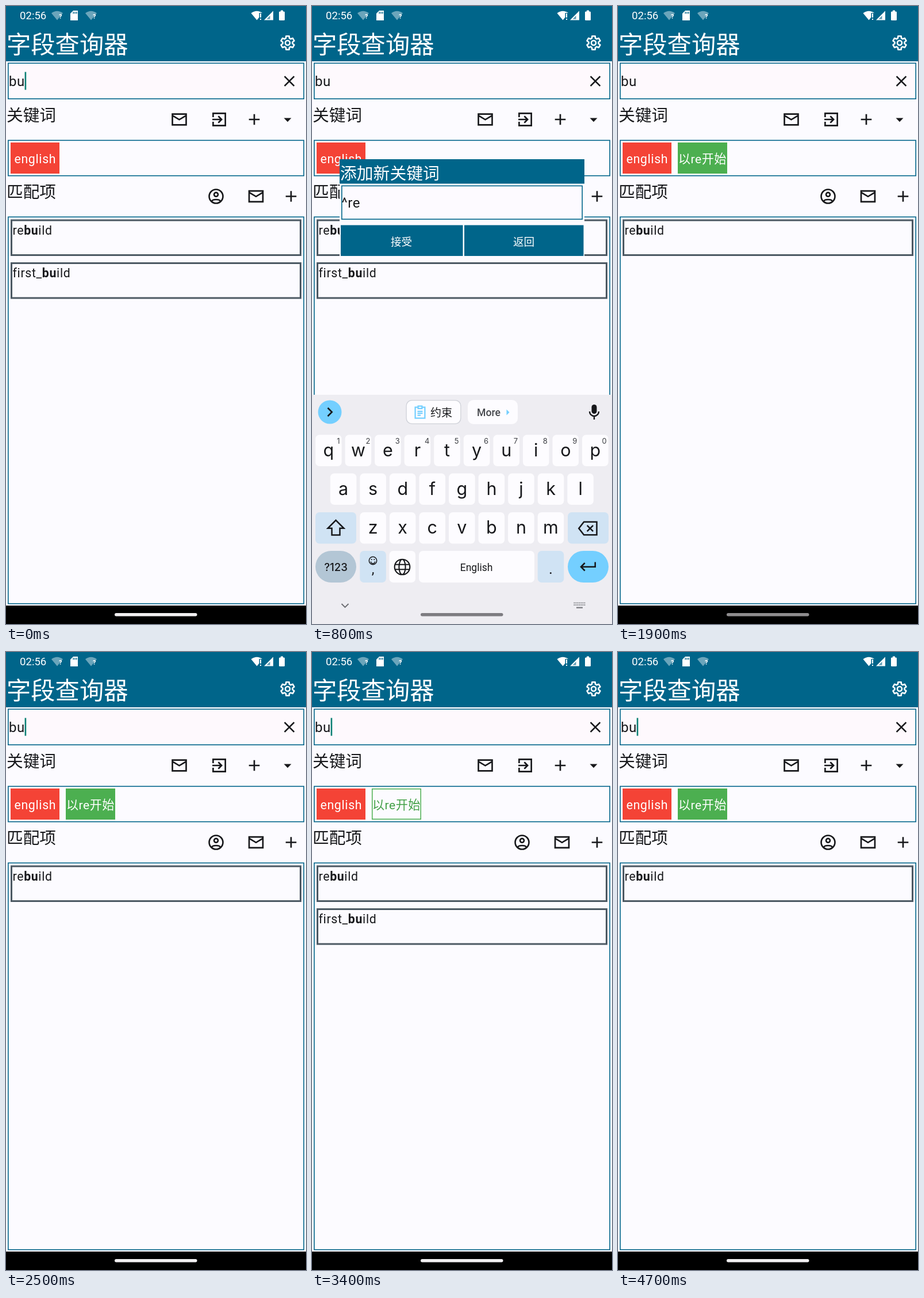
An HTML page with a canvas for the animation above (4.8 s loop, 522 by 1073 pixels).

```html
<!DOCTYPE html>
<html lang="zh-CN">
<head>
<meta charset="utf-8">
<title>字段查询器</title>
<style>
html, body { margin: 0; width: 100%; height: 100%; overflow: hidden; background: #fcfbff; }
canvas { display: block; width: 100vw; height: 100vh; }
</style>
</head>
<body>
<canvas id="stage" width="522" height="1073"></canvas>
<script>
const ctx = document.getElementById('stage').getContext('2d');
const LOOP = 4800, STEP = 100;
const BLUE = '#00658a', PAPER = '#fcfbff', INK = '#17181b', RED = '#f44336', GREEN = '#4caf50';
const KEY = '#fdfcff', TINT = '#d0e3f4', SKY = '#74cfff', BOARD = '#eeedf2';
const SANS = 'Roboto, "Noto Sans CJK SC", "Noto Sans CJK", sans-serif';
const ROUND = 'Inter, Roboto, sans-serif';

// 24-unit icons, drawn as strokes
const ICONS = {
  mail: 'M3 5H21V19H3ZM3 6.8L12 12.2L21 6.8',
  exit: 'M4 9V4H20V20H4V15M3 12H15M10.8 7.7L15.1 12L10.8 16.3',
  plus: 'M5 12H19M12 5V19',
  close: 'M5.7 5.7L18.3 18.3M18.3 5.7L5.7 18.3',
  account: 'M21 12A9 9 0 1 1 3 12A9 9 0 1 1 21 12M14.6 9.6A2.6 2.6 0 1 1 9.4 9.6A2.6 2.6 0 1 1 14.6 9.6M6 18.4C8.4 15.4 15.6 15.4 18 18.4',
  shift: 'M12 3.5L21 12.5H16.5V20H7.5V12.5H3Z',
  erase: 'M8 5H22V19H8L2.5 12ZM11.5 8.8L18 15.2M18 8.8L11.5 15.2',
  globe: 'M21.5 12A9.5 9.5 0 1 1 2.5 12A9.5 9.5 0 1 1 21.5 12M16 12A4 9.5 0 1 1 8 12A4 9.5 0 1 1 16 12M3.4 9H20.6M3.4 15H20.6',
  enter: 'M20.5 7V12.5H4M8.5 8L4 12.5L8.5 17',
  right: 'M9 6L15 12L9 18',
  down: 'M6 9L12 15L18 9',
  clip: 'M9 4.5H4.5V21.5H19.5V4.5H15M9 2.8H15V6.5H9ZM8 11H16M8 14H16M8 17H13'
};

const clamp = v => Math.max(0, Math.min(1, v));
const ramp = (t, a, b) => clamp((t - a) / (b - a));

function fill(x, y, w, h, color, r = 0) {
  ctx.fillStyle = color;
  ctx.beginPath();
  ctx.roundRect(x, y, w, h, r);
  ctx.fill();
}

function box(x, y, w, h, color, line) {
  ctx.strokeStyle = color;
  ctx.lineWidth = line;
  ctx.strokeRect(x + line / 2, y + line / 2, w - line, h - line);
}

function poly(points, color) {
  ctx.fillStyle = color;
  ctx.beginPath();
  points.forEach(([x, y]) => ctx.lineTo(x, y));
  ctx.fill();
}

function disc(x, y, r, color) {
  ctx.fillStyle = color;
  ctx.beginPath();
  ctx.arc(x, y, r, 0, 7);
  ctx.fill();
}

function text(s, x, y, size, color = INK, o = {}) {
  ctx.font = `${o.weight || 400} ${size}px ${o.font || SANS}`;
  ctx.textAlign = o.align || 'left';
  ctx.letterSpacing = (o.gap || 0) + 'px';
  ctx.fillStyle = color;
  ctx.fillText(s, x, y);
  return x + ctx.measureText(s).width;
}

function icon(name, x, y, color = INK, scale = 1.33, line = 2) {
  ctx.save();
  ctx.translate(x, y);
  ctx.scale(scale, scale);
  ctx.translate(-12, -12);
  ctx.strokeStyle = color;
  ctx.lineWidth = line;
  ctx.stroke(new Path2D(ICONS[name]));
  ctx.restore();
}

function scaled(x, y, s, draw) {
  ctx.save();
  ctx.translate(x, y);
  ctx.scale(s, s);
  ctx.translate(-x, -y);
  draw();
  ctx.restore();
}

function gear(x, y) {
  ctx.strokeStyle = '#fff';
  ctx.lineWidth = 2.6;
  ctx.lineJoin = 'round';
  ctx.beginPath();
  for (let i = 0; i < 6; i++) {
    const a = i * Math.PI / 3 + Math.PI / 6;
    [[-.37, 8.6], [-.22, 12], [.22, 12], [.37, 8.6]].forEach(([d, r]) =>
      ctx.lineTo(x + r * Math.sin(a + d + Math.PI / 6), y - r * Math.cos(a + d + Math.PI / 6)));
  }
  ctx.closePath();
  ctx.stroke();
  ctx.beginPath();
  ctx.arc(x, y, 4, 0, 7);
  ctx.stroke();
  ctx.lineJoin = 'miter';
}

function fan(x, color) {
  ctx.fillStyle = color;
  ctx.beginPath();
  ctx.moveTo(x, 24.5);
  ctx.lineTo(x - 10, 12.5);
  ctx.quadraticCurveTo(x, 5, x + 10, 12.5);
  ctx.fill();
}

function header() {
  fill(0, 0, 522, 96, BLUE);
  text('02:56', 24, 23, 18.6, '#fff');
  for (const x of [89, 148]) {
    fan(x, 'rgba(255,255,255,.42)');
    text('?', x + 3, 22, 11, '#fff', { weight: 700 });
  }
  poly([[112, 13], [117, 8], [125, 8], [125, 25], [112, 25]], '#fff');
  for (let i = 0; i < 3; i++) fill(116.5 + i * 2.8, 10, 1.4, 3.5, BLUE);
  fan(436.5, '#fff');
  fill(440.5, 12, 6, 13, BLUE);
  fill(442, 13, 2, 7, '#fff');
  fill(442, 22, 2, 2, '#fff');
  poly([[449, 24.5], [465, 8.5], [465, 24.5]], '#fff');
  poly([[453.5, 22.8], [459.5, 16.8], [459.5, 22.8]], '#5f9db5');
  fill(475, 9.5, 10, 15.5, '#fff', 1.5);
  fill(478, 7.5, 4, 3, '#fff');
  text('字段查询器', 1, 81.5, 42.3, '#fff');
  gear(490, 64);
}

function caret(x, y, h) {
  fill(x, y, 2.6, h, '#0b8074');
}

function row(y, parts) {
  box(8, y, 506, 63.5, '#4c5963', 3);
  let x = 11.5;
  parts.forEach((s, i) => {
    x = text(s, x, y + 26, 21.3, INK, { gap: .66, weight: i === 1 ? 700 : 400 });
  });
}

function ruleChip(on, shade) {
  if (on) fill(104, 237, 86, 54, GREEN);
  fill(104, 237, 86, 54, `rgba(0,0,0,${.13 * shade})`);
  if (!on) box(104, 237, 86, 54, GREEN, 1.5);
  const dim = Math.round(255 - 35 * shade);
  text('以re开始', 105, 273, 21.1, on ? `rgb(${dim},${dim},${dim})` : '#43a047', { gap: .5 });
}

function page(s) {
  fill(0, 96, 522, 977, PAPER);
  fill(4, 100, 514, 61, '#fef9fd');
  box(3, 98.5, 516, 63.5, BLUE, 1.6);
  text('bu', 5, 138.5, 24, INK, { gap: .6 });
  if (s.caret) caret(32.6, 114.5, 31);
  icon('close', 493, 130.5);

  text('关键词', 1, 199.5, 28.7);
  icon('mail', 301.5, 197);
  icon('exit', 371, 197);
  icon('plus', 432, 197);
  poly([[483.5, 194.5], [496.5, 194.5], [490, 201.2]], INK);

  box(3, 232.5, 516, 63, BLUE, 1.6);
  fill(8, 237, 85, 54, RED);
  text('english', 14.5, 273, 21.3, '#fff', { gap: .66 });
  if (s.rule) ruleChip(s.on, s.shade);

  text('匹配项', 1, 332.5, 28.7);
  icon('account', 365.5, 330.5);
  icon('mail', 435, 330.5);
  icon('plus', 496, 330.5);

  box(3, 365.5, 516, 673, BLUE, 1.6);
  row(370.5, ['re', 'bu', 'ild']);
  if (!(s.rule && s.on)) row(445, ['first_', 'bu', 'ild']);
  fill(0, 1041, 522, 32, '#000');
}

function dialog(showCaret) {
  fill(48, 266, 426, 168, PAPER);
  fill(48, 266, 426, 42.5, BLUE);
  text('添加新关键词', 49, 300.5, 28.8, '#fff');
  fill(51, 312, 419, 58, '#fdfaff');
  box(51, 311.5, 420, 59.5, BLUE, 1.6);
  text('^re', 51.5, 350, 24, INK, { gap: .6 });
  if (showCaret) caret(82.2, 325, 32);
  fill(50, 380.5, 212.5, 53.5, BLUE);
  fill(265, 380.5, 207.5, 53.5, BLUE);
  text('接受', 155.5, 415.5, 18.6, '#fff', { align: 'center' });
  text('返回', 368.5, 415.5, 18.6, '#fff', { align: 'center' });
}

function suggestions(shrink) {
  disc(31, 705, 20.5, SKY);
  icon('right', 31, 705, INK, 1.2, 2.2);
  if (shrink < 1) {
    scaled(211.5, 705, 1 - .2 * shrink * 2, () => {
      fill(163.5, 684, 96, 42, '#cfd1d8', 10);
      fill(164.8, 685.3, 93.4, 39.4, KEY, 9);
      icon('clip', 188, 705, SKY, 1.12, 2);
      text('约束', 206, 713, 19);
    });
    scaled(314.5, 705, 1 - .6 * shrink * 2 * .98, () => {
      ctx.globalAlpha = 1 - shrink;
      fill(271, 684, 87, 42, KEY, 10);
      text('More', 287, 712, 17.6, '#44464b', { weight: 500 });
      poly([[338.5, 700.5], [343.5, 705.5], [338.5, 710.5]], SKY);
    });
  }
  fill(486.5, 692, 9, 16, INK, 4.5);
  ctx.strokeStyle = INK;
  ctx.lineWidth = 2.4;
  ctx.beginPath();
  ctx.arc(491, 704, 8, 0, Math.PI);
  ctx.moveTo(491, 712);
  ctx.lineTo(491, 718);
  ctx.stroke();
}

function letters(chars, left, top) {
  [...chars].forEach((c, i) => {
    const x = left + i * 51.56;
    fill(x, top, 45.6, 54.5, KEY, 7);
    text(c, x + 22.8, top + 37, 30.5, INK, { align: 'center', font: ROUND });
  });
}

function keyboard(dy, shrink) {
  ctx.save();
  ctx.translate(0, dy);
  fill(0, 675, 522, 398, BOARD);
  suggestions(shrink);
  letters('qwertyuiop', 6, 744.5);
  [...'1234567890'].forEach((c, i) =>
    text(c, 46 + i * 51.4, 760, 13, '#3c3e43', { align: 'center', font: ROUND }));
  letters('asdfghjkl', 31.8, 811.5);
  letters('zxcvbnm', 83.3, 879);

  fill(6, 879, 71, 54.5, TINT, 7);
  icon('shift', 41.5, 906, INK, 1.55, 1.6);
  fill(445, 879, 71, 54.5, TINT, 7);
  icon('erase', 479.5, 907, INK, 1.6, 1.6);

  fill(6, 946, 71, 55, '#b3c6d5', 27.5);
  text('?123', 41.5, 981, 18.6, INK, { align: 'center', font: ROUND, weight: 500 });
  fill(83.3, 946, 45.6, 55, TINT, 7);
  ctx.strokeStyle = INK;
  ctx.lineWidth = 1.5;
  ctx.beginPath();
  ctx.arc(106, 963, 6.7, 0, 7);
  ctx.moveTo(109.5, 964.5);
  ctx.arc(106, 964.5, 3.5, 0, Math.PI);
  ctx.stroke();
  disc(103.7, 961, 1.1, INK);
  disc(108.3, 961, 1.1, INK);
  text(',', 106, 986, 24, INK, { align: 'center' });
  fill(134.5, 946, 45.6, 55, KEY, 7);
  icon('globe', 157, 974, INK, 1.4, 1.5);
  fill(186, 946, 201, 55, KEY, 7);
  text('English', 286, 980.5, 17.5, INK, { align: 'center' });
  fill(392.7, 946, 45.6, 55, TINT, 7);
  text('.', 415.5, 986, 26, INK, { align: 'center' });
  fill(445, 946, 71, 55, SKY, 27.5);
  icon('enter', 480, 973, INK, 1.5, 1.7);

  icon('down', 57.5, 1041, '#6a6b70', 1, 1.8);
  for (let i = 0; i < 15; i++)
    fill(455.5 + i % 7 * 3 + (i > 13 ? 100 : 0), 1035.5 + Math.floor(i / 7) * 3.5, 1.8, 1.8, '#77787d');
  fill(460, 1043.5, 11, 2.2, '#77787d');
  ctx.restore();
}

function touch(x, y) {
  disc(x, y, 15, 'rgba(70,120,150,.35)');
  disc(x, y, 13.8, 'rgba(205,222,235,.72)');
  disc(x, y, 10, 'rgba(225,234,242,.3)');
}

function pillColor(t) {
  if (t >= 100 && t < 1900) return '#7d7c81';
  const v = t < 100 ? 242 : Math.round(142 + 100 * ramp(t, 1900, 2300));
  return `rgb(${v},${v - 2},${v})`;
}

const within = (t, a, b) => t >= a && t < b;
const press = (t, a) => ramp(t, a - 100, a) * (1 - ramp(t, a + 400, a + 700));

function render(t) {
  const open = within(t, 100, 1500);
  const blink = within((t < 100 ? t + LOOP : t) % 1000, 400, 900);
  page({
    caret: !open && blink && !within(t, 1500, 1900),
    rule: t >= 1500,
    on: !within(t, 2800, 3600),
    shade: Math.max(press(t, 2700), press(t, 3500))
  });
  header();
  if (open) dialog((t - 100) % 1000 < 500);
  if (within(t, 100, 1800)) {
    const slide = ramp(t, 1500, 1800);
    keyboard(398 * slide * slide, ramp(t, 1300, 1500));
  }
  fill(189, 1054, 143.5, 5.5, pillColor(t), 2.75);
  if (within(t, 1300, 1500)) touch(183, 422);
  if (within(t, 2700, 2900) || within(t, 3500, 3700)) touch(147, 265);
}

const start = performance.now();
function tick() {
  const t = (performance.now() - start) % LOOP;
  render(Math.floor(t / STEP) * STEP);
  requestAnimationFrame(tick);
}
tick();
</script>
</body>
</html>
```
